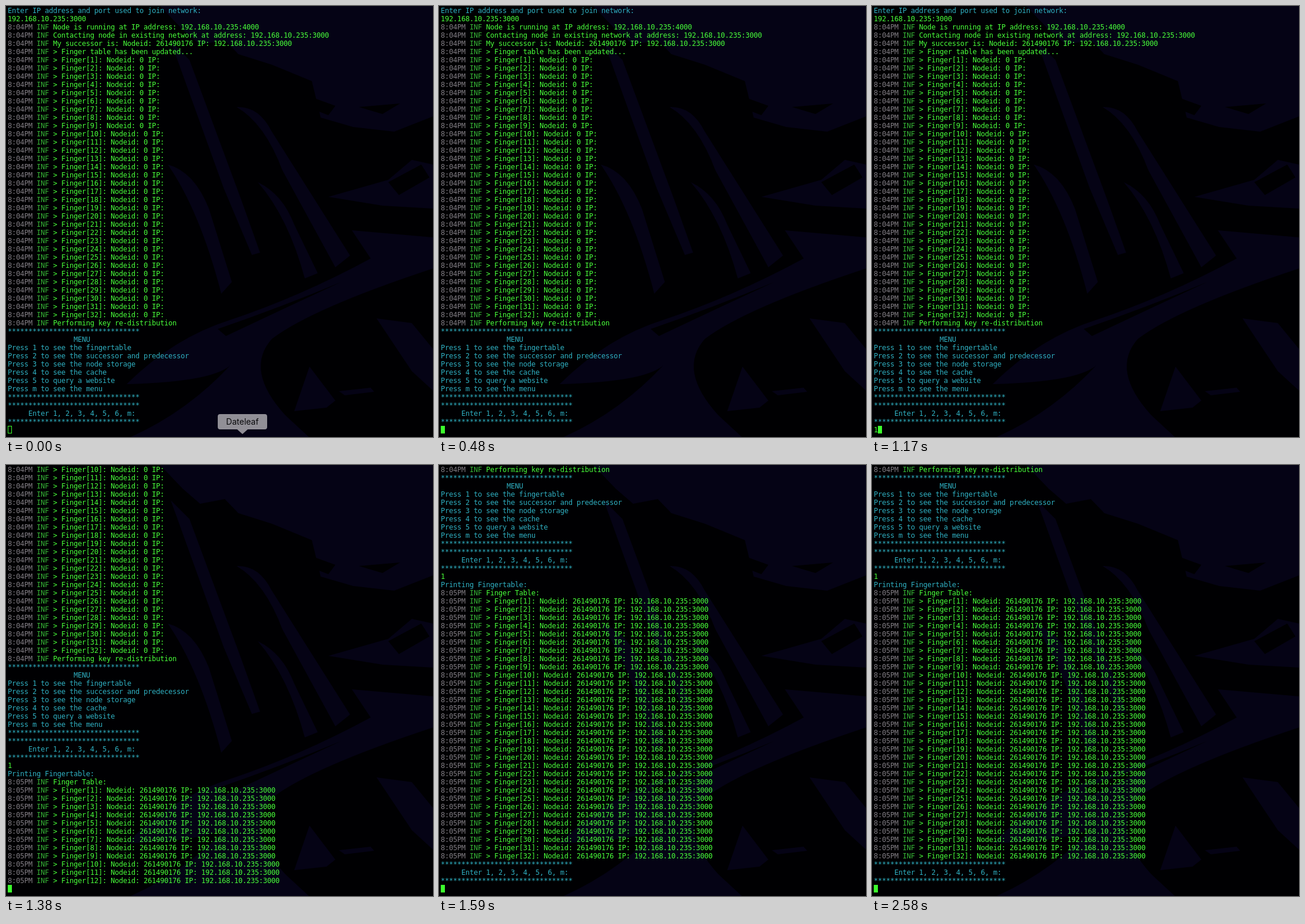
Animation of 726x734 px, one loop 2.64 s. Source, as an HTML page with a canvas:

```html
<!DOCTYPE html>
<html lang="en">
<head>
<meta charset="utf-8">
<title>Terminal</title>
<style>
  html, body { margin: 0; width: 726px; height: 734px; overflow: hidden; background: #000; }
  canvas { display: block; }
</style>
</head>
<body>
<canvas id="stage" width="726" height="734"></canvas>
<script>
const W = 726, H = 734, LOOP = 2640;
const CELL_W = 7, ROW_H = 14, LEFT = 3, TOP = 1, ROWS = 52;
const GREEN = '#48ff3a', CYAN = '#2fb0c2', GRAY = '#817d83', INFO = '#36b436';
const BLACK = '#000002', NAVY = '#050315';
const PROMPT_LINE = 51;
const ctx = document.getElementById('stage').getContext('2d');

// Terminal contents: every line is a list of [text, colour] spans.
const cyan = text => [[text, CYAN]];
const green = text => [[text, GREEN]];
const log = (time, text) => [[time + ' ', GRAY], ['INF ', INFO], [text, GREEN]];
const fingers = (time, tail) => Array.from({ length: 32 },
  (_, i) => log(time, `> Finger[${i + 1}]: Nodeid: ${tail}`));
const stars = cyan('*'.repeat(32));
const prompt = [stars, cyan('     Enter 1, 2, 3, 4, 5, 6, m:'), stars];
const peer = '192.168.10.235:3000';

const lines = [
  cyan('Enter IP address and port used to join network:'),
  green(peer),
  log('8:04PM', 'Node is running at IP address: 192.168.10.235:4000'),
  log('8:04PM', 'Contacting node in existing network at address: ' + peer),
  log('8:04PM', 'My successor is: Nodeid: 261490176 IP: ' + peer),
  log('8:04PM', '> Finger table has been updated...'),
  ...fingers('8:04PM', '0 IP:'),
  log('8:04PM', 'Performing key re-distribution'),
  stars,
  cyan(' '.repeat(16) + 'MENU'),
  cyan('Press 1 to see the fingertable'),
  cyan('Press 2 to see the successor and predecessor'),
  cyan('Press 3 to see the node storage'),
  cyan('Press 4 to see the cache'),
  cyan('Press 5 to query a website'),
  cyan('Press m to see the menu'),
  stars,
  ...prompt,
  green('1'),
  cyan('Printing Fingertable:'),
  log('8:05PM', 'Finger Table:'),
  ...fingers('8:05PM', '261490176 IP: ' + peer),
  ...prompt
];

// Dim wallpaper behind the terminal.
function makeWallpaper() {
  const layer = document.createElement('canvas');
  layer.width = W;
  layer.height = H;
  const g = layer.getContext('2d');
  const shape = (color, path) => {
    g.fillStyle = color;
    g.fill(new Path2D(path));
  };
  shape(BLACK, `M0 0H${W}V${H}H0Z`);
  // sky and ridge
  shape(NAVY, 'M262 0H726V188L660 214L590 206L535 190L520 128L452 100L395 82L372 58L330 66L300 40Z');
  shape(BLACK, 'M505 150L560 170L548 186L512 172ZM600 172L670 166L640 184Z');
  // building faces
  shape(NAVY, 'M280 60L312 92L400 330L432 420L418 424L370 310Z');
  shape(NAVY, 'M392 172Q430 170 452 214L585 425L560 445L470 280Q440 200 392 172Z');
  shape(NAVY, 'M275 270Q320 282 345 345L384 470L366 490Q330 350 275 270Z');
  shape(NAVY, 'M428 300Q470 320 490 372L530 455L508 464Q480 360 428 300Z');
  shape(NAVY, 'M548 325L650 296L690 262L726 270V345L640 340Z');
  shape(BLACK, 'M650 300L706 270L720 292L668 322Z');
  // road with its inner bend
  shape(NAVY, 'M588 382L726 394V447Q520 515 452 567Q405 620 475 697L515 734H212Q310 690 385 608Q360 640 205 644Q285 565 380 535Q500 495 620 430Z');
  shape(BLACK, 'M360 550Q470 512 570 470L480 512L374 562Z');
  // foreground rocks
  shape(NAVY, 'M516 614L560 672L545 684L490 690Z');
  shape(NAVY, 'M630 532L690 540L726 584V655L690 622Z');
  shape(NAVY, 'M566 656L620 650L626 657L576 663Z');
  return layer;
}

function drawLine(spans, row) {
  let col = 0;
  for (const [text, color] of spans) {
    ctx.fillStyle = color;
    for (const char of text) {
      if (char !== ' ') ctx.fillText(char, LEFT + col * CELL_W, TOP + row * ROW_H + 11);
      col++;
    }
  }
}

function drawCursor(col, row, focused) {
  const x = LEFT + col * CELL_W, y = TOP + row * ROW_H;
  ctx.fillStyle = ctx.strokeStyle = '#3cff2c';
  ctx.lineWidth = 1;
  if (focused) ctx.fillRect(x, y, CELL_W, ROW_H - 1);
  else ctx.strokeRect(x + 0.5, y + 0.5, CELL_W - 1, ROW_H - 2);
}

function drawLabel(alpha) {
  if (alpha <= 0) return;
  ctx.save();
  ctx.globalAlpha = alpha;
  ctx.fillStyle = '#918f96';
  ctx.beginPath();
  ctx.roundRect(360, 695, 84, 26, 4);
  ctx.moveTo(393, 721);
  ctx.lineTo(411, 721);
  ctx.lineTo(402, 729);
  ctx.fill();
  ctx.fillStyle = '#08080a';
  ctx.font = '14px Inter, sans-serif';
  ctx.textAlign = 'center';
  ctx.fillText('Dateleaf', 402, 713);
  ctx.restore();
}

const wallpaper = makeWallpaper();

function render(t) {
  const typed = t >= 780 && t < 1380;
  const cursorLine = t < 1380 ? PROMPT_LINE : t < 1410 ? 66 : lines.length;
  const first = cursorLine - (ROWS - 1);
  ctx.drawImage(wallpaper, 0, 0);
  ctx.font = '12px "DejaVu Sans Mono", monospace';
  for (let i = first; i < cursorLine; i++) drawLine(lines[i], i - first);
  if (typed) drawLine(lines[PROMPT_LINE], ROWS - 1);
  drawCursor(typed ? 1 : 0, ROWS - 1, t >= 240);
  drawLabel(t < 30 ? 1 : t < 480 ? (1 - (t - 30) / 450) ** 2 : 0);
}

const start = performance.now();
function tick() {
  render((performance.now() - start) % LOOP);
  requestAnimationFrame(tick);
}
tick();
</script>
</body>
</html>
```
